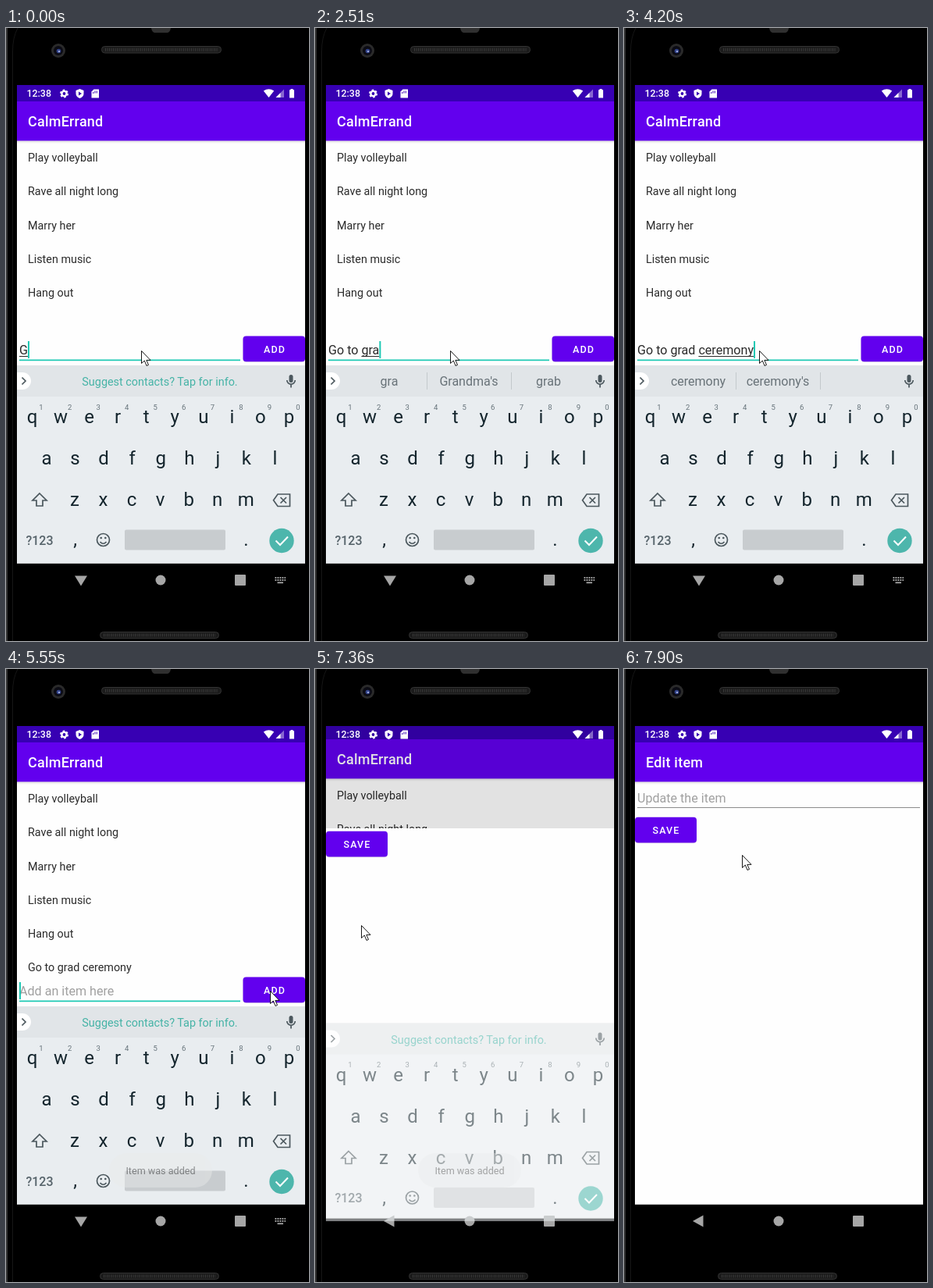
Animation of 388x785 px, one loop 8 s. Source, as an HTML page:

```html
<!DOCTYPE html>
<html lang="en">
<head>
<meta charset="utf-8">
<title>Todo list on a phone</title>
<style>
html, body { margin: 0; height: 100%; overflow: hidden; background: #000; }
svg { display: block; }
text { font-family: Roboto, sans-serif; white-space: pre; }
.mid { text-anchor: middle; }
.bar { font-size: 18px; font-weight: 500; letter-spacing: .22px; fill: #fff; }
.btn { font-size: 12.5px; font-weight: 500; letter-spacing: 1.1px; fill: #fff; text-anchor: middle; }
.field { font-size: 16.1px; fill: #2b2b2b; }
.hint { font-size: 16.1px; fill: #a0a0a0; }
.item { font-size: 14.35px; fill: #2b2b2b; }
.word { font-size: 16px; fill: #687278; text-anchor: middle; }
.key { font-size: 24px; fill: #14252d; text-anchor: middle; }
.num { font-size: 9.5px; fill: #66737a; text-anchor: middle; }
.icon { fill: none; stroke: #4b575d; stroke-width: 1.7; }
</style>
</head>
<body>
<svg width="388" height="785" viewBox="0 0 388 785">
  <defs>
    <clipPath id="screen"><rect x="14" y="73" width="369" height="612.6"/></clipPath>
    <clipPath id="reveal"><rect id="revealBox" x="14" y="73" width="369" height="640"/></clipPath>
    <linearGradient id="shade" x2="0" y2="1">
      <stop stop-color="#000" stop-opacity=".14"/><stop offset="1" stop-color="#000" stop-opacity="0"/>
    </linearGradient>
  </defs>

  <!-- phone body -->
  <rect width="388" height="785"/>
  <rect width="2" height="785" fill="#363636"/>
  <path d="M8.500 785V30Q8.500 12 15 0" fill="none" stroke="#161616"/>
  <path d="M186 0h25q-1 6-5 6h-15q-4 0-5-6z" fill="#303030"/>
  <circle cx="67" cy="29" r="9" fill="#2a2a2a"/>
  <circle cx="67" cy="29" r="6" fill="#0b0b14"/>
  <circle cx="67.500" cy="29.500" r="2.800" fill="#34458c"/>
  <circle cx="68" cy="30" r="1.100" fill="#b9c3ea"/>
  <g fill="#1b1b1b" stroke="#333">
    <rect x="122.500" y="23.500" width="153" height="8.500" rx="4"/>
    <rect x="120.500" y="773.500" width="152" height="8" rx="4"/>
  </g>
  <g stroke="#3a3a3a" stroke-width="4" stroke-dasharray="1 1.5">
    <path d="M127 27.700h144M125 777.500h143"/>
  </g>

  <!-- list screen -->
  <g clip-path="url(#screen)">
    <g id="list">
      <rect x="14" y="73" width="369" height="640" fill="#fefefe"/>
      <rect x="14" y="144" width="369" height="4" fill="url(#shade)"/>
      <rect x="14" y="73" width="369" height="21.300" fill="#3700b3"/>
      <rect x="14" y="94" width="369" height="50.400" fill="#6200ee"/>
      <text class="bar" x="28" y="126">CalmErrand</text>
      <g id="items"></g>
      <text id="addHint" class="hint" x="17" y="418">Add an item here</text>
      <text id="field" class="field" x="17" y="418"></text>
      <path id="underline" stroke="#2b2b2b"/>
      <rect x="17" y="424.500" width="283" height="1.700" fill="#1cc9b4"/>
      <rect id="caret" y="401" width="2" height="22" fill="#1cc9b4"/>
      <rect x="303.500" y="395" width="79.500" height="33" rx="4" opacity=".1"/>
      <rect x="303.500" y="394.600" width="79.500" height="32.600" rx="4" fill="#6200ee"/>
      <rect id="ripple" x="303.500" y="394.600" width="79.500" height="32.600" rx="4" fill="#fff"/>
      <text class="btn" x="344" y="415.700">ADD</text>
    </g>
    <rect id="dim" x="14" y="73" width="369" height="613"/>
  </g>

  <!-- edit screen -->
  <g id="editClip" clip-path="url(#reveal)">
    <g id="edit">
      <rect x="14" y="73" width="369" height="612.600" fill="#fefefe"/>
      <rect x="14" y="144" width="369" height="4" fill="url(#shade)"/>
      <rect x="14" y="73" width="369" height="21.300" fill="#3700b3"/>
      <rect x="14" y="94" width="369" height="50.400" fill="#6200ee"/>
      <text class="bar" x="28" y="126">Edit item</text>
      <text class="hint" x="17" y="171">Update the item</text>
      <path d="M17 177.500h362" stroke="#8c8c8c"/>
      <rect x="14" y="190.200" width="79" height="33" rx="4" opacity=".1"/>
      <rect x="14" y="189.800" width="79" height="32.600" rx="4" fill="#6200ee"/>
      <text class="btn" x="54" y="210.900">SAVE</text>
    </g>
  </g>

  <!-- navigation bar -->
  <g fill="#a6a6a6">
    <path id="back"/>
    <circle cx="198" cy="707" r="6.500"/>
    <rect x="293" y="700" width="14" height="14" rx="1"/>
    <g id="switcher" fill="none" stroke="#a6a6a6" stroke-width="1.800" stroke-dasharray="1.8 1.2">
      <path d="M344.500 704h13.500M344.500 707h13.500"/><path d="M347.500 710.300h7.500" stroke-dasharray="none"/>
    </g>
  </g>

  <!-- keyboard -->
  <g id="keyboard">
    <rect x="14" y="432" width="369" height="253.600" fill="#e9edf0"/>
    <rect x="14" y="432" width="369" height="40" fill="#e1e5e8"/>
    <path d="M14 441h7a11 11 0 0 1 0 22h-7z" fill="#fff"/>
    <path class="icon" d="M20.500 447.500l4.500 4.500-4.500 4.500"/>
    <text id="tip" class="mid" x="197" y="458" font-size="14.4" fill="#45b3a6">Suggest contacts? Tap for info.</text>
    <g id="words">
      <path d="M143.500 441v22M251.500 441v22" stroke="#c3c9cc"/>
      <text class="word" x="95" y="458"></text>
      <text class="word" x="197" y="458"></text>
      <text class="word" x="299" y="458"></text>
    </g>
    <rect x="362.500" y="444" width="5" height="10" rx="2.500" fill="#4b575d"/>
    <path class="icon" d="M359.800 451a5.200 5.200 0 0 0 10.400 0M365 456.500v4"/>
    <g id="keys"></g>
    <path class="icon" d="M43 596l9 9h-5v7h-8v-7h-5z"/>
    <path class="icon" d="M348 597h15.500v15.500h-15.500l-5.500-7.750zM351.500 601l7.500 7.500m0-7.500l-7.500 7.500"/>
    <text class="mid" x="43" y="661.500" font-size="16" font-weight="500" fill="#56636a">?123</text>
    <text class="key" x="88.500" y="663">,</text>
    <text class="key" x="307.500" y="663">.</text>
    <circle class="icon" cx="124.500" cy="655.500" r="8"/>
    <path class="icon" d="M120.500 658q4 4.500 8 0"/>
    <circle cx="121.700" cy="653" r="1.300" fill="#4b575d"/>
    <circle cx="127.300" cy="653" r="1.300" fill="#4b575d"/>
    <rect x="152" y="642.500" width="129" height="26" rx="2" fill="#c8cccf"/>
    <circle cx="353" cy="656.500" r="15.700" fill="#4db6ac"/>
    <path d="M345.500 656.500l5.500 5.500 10-10.500" fill="none" stroke="#fff" stroke-width="2"/>
  </g>

  <g id="toast">
    <rect x="132" y="620" width="132" height="44" rx="22" fill="#e9ebeb"/>
    <text class="mid" x="198" y="647" font-size="12.6" fill="#151515">Item was added</text>
  </g>

  <!-- status bar -->
  <g fill="#fff">
    <text x="26.500" y="88.300" font-size="12.4" font-weight="500">12:38</text>
    <circle cx="74.500" cy="84" r="3.100" fill="none" stroke="#fff" stroke-width="2.400"/>
    <circle cx="74.500" cy="84" r="4.700" fill="none" stroke="#fff" stroke-width="1.600" stroke-dasharray="2.6 2.32"/>
    <path d="M94.500 78l5 2v4q0 4-5 6-5-2-5-6v-4z"/>
    <path d="M93 81.500l4 2.500-4 2.500z" fill="#3700b3"/>
    <path d="M112.500 78.500h6.500v11h-9.500v-8z"/>
    <path d="M111.800 82v2m2.200-3.500v3m2.300-3v3" stroke="#3700b3"/>
    <path d="M329.800 80.500q6.700-4.500 13.400 0l-6.700 8.500z"/>
    <path d="M345.500 89h10.500v-10.500z" opacity=".4"/>
    <path d="M345.500 89h6v-6z"/>
    <path d="M364.500 78h3v1.200h1.500v10.300h-6v-10.300h1.500z"/>
  </g>

  <path id="mouse" d="M.5 .5V16.500L4.300 13l2.700 6.500 2.500-1.100-2.700-6h5.200z" fill="#fff" stroke="#000" stroke-width=".9"/>
</svg>

<script>
const LOOP = 8000, ADDED = 5310, OPEN = 7360;
const $ = id => document.getElementById(id);
const set = (id, attrs) => { for (const k in attrs) $(id).setAttribute(k, attrs[k]); };
const show = (id, on) => { $(id).style.display = on ? "" : "none"; };
const move = (id, x, y) => set(id, { transform: `translate(${x} ${y})` });

// Latest entry [time, ...values] that has begun at time t.
const at = (steps, t) => steps.findLast(s => s[0] <= t);

const typed = [
  [0, "G"], [500, "Go"], [750, "Go "], [1120, "Go t"], [1240, "Go to"], [1490, "Go to "],
  [1990, "Go to g"], [2130, "Go to gr"], [2510, "Go to gra"], [2630, "Go to grad"], [2770, "Go to grad "],
  [3150, "Go to grad ce"], [3400, "Go to grad cer"], [3550, "Go to grad cerem"], [3800, "Go to grad ceremo"],
  [3920, "Go to grad ceremon"], [4200, "Go to grad ceremony"], [ADDED, ""]
];
const suggested = [
  [0], [750, "to", "buy", "out"], [1120, "t", "the", "Tomorrow"], [1240, "to", "too", "Tomorrow"],
  [1490, "the", "sleep", "be"], [1990, "g", "get", "go"], [2260, "gr", "great", "Grandma's"],
  [2510, "gra", "Grandma's", "grab"], [2630, "grad", "graduation", "graduate"], [2900, "at", "school", "party"],
  [3150, "ce", "cell", "cent"], [3400, "cer", "cereal", "certainly"], [3550, "cerem", "ceremony", "ceremonies"],
  [3800, "ceremo", "ceremony", "ceremonies"], [3920, "ceremon", "ceremony", "ceremonies"],
  [4200, "ceremony", "ceremony's", ""], [ADDED]
];
const pointer = [
  [0, 173, 413], [4630, 190, 411], [4750, 222, 405], [4900, 317, 393], [5050, 334, 406], [5170, 338, 412],
  [5820, 325, 405], [5940, 285, 388], [6060, 215, 366], [6180, 165, 351], [6330, 128, 349],
  [6480, 92, 339], [6600, 68, 330], [6720, 59, 328], [7900, 151, 238]
];
const ripple = [[0, 0], [5310, .25], [5430, .12], [5550, 0]];
const toast = [
  [0, 0], [5430, .15], [5550, .44], [5700, .8], [5820, 1], [7110, 0],
  [OPEN, .36], [7480, .2], [7630, .08], [7760, 0]
];
// time, top of revealed area, its offset, list offset, dimming, keyboard opacity, keyboard offset
const opening = [
  [0, 713, 0, 0, 0, 1, 0], [OPEN, 204, 18, -4, .11, .55, 21.5],
  [7480, 96, 4, -9, .1, .1, 38], [7630, 74, .5, -10, .1, 0, 0], [7760, 73, 0, 0, 0, 0, 0]
];

const label = (cls, x, y, s) => `<text class="${cls}" x="${x}" y="${y}">${s}</text>`;
const keyRow = (letters, x, y) => [...letters].map((c, i) => label("key", x + 36.55 * i, y, c)).join("");

$("items").innerHTML =
  ["Play volleyball", "Rave all night long", "Marry her", "Listen music", "Hang out", "Go to grad ceremony"]
    .map((s, i) => label("item", 28, 171.3 + 43.1 * i, s)).join("");
$("keys").innerHTML =
  keyRow("qwertyuiop", 33.5, 506) + keyRow("asdfghjkl", 52, 559) + keyRow("zxcvbnm", 88, 612) +
  [..."1234567890"].map((c, i) => label("num", 45 + 36.55 * i, 488.5, c)).join("");
const newItem = $("items").lastChild;
const words = $("words").querySelectorAll("text");

function drawField(t) {
  const [since, text] = at(typed, t);
  const field = $("field");
  field.textContent = text;
  const width = n => n ? field.getSubStringLength(0, n) : 0;
  const end = 17 + width(text.length);
  const start = 17 + width(text.lastIndexOf(" ") + 1);
  set("underline", { d: `M${start} 420.5H${end}` });
  set("caret", { x: end });
  show("caret", (t - since + 30) % 1000 < 540);
  show("addHint", !text);
}

function render(t) {
  drawField(t);
  newItem.style.display = t < ADDED ? "none" : "";

  const [, ...options] = at(suggested, t);
  show("tip", !options.length);
  show("words", options.length);
  words.forEach((w, i) => { w.textContent = options[i] || ""; });

  const [, top, editY, listY, dim, kbAlpha, kbY] = at(opening, t);
  set("revealBox", { y: top });
  show("editClip", t >= OPEN);
  move("edit", 0, editY);
  move("list", 0, listY);
  set("dim", { opacity: dim });
  set("keyboard", { opacity: kbAlpha });
  move("keyboard", 0, kbY);

  set("ripple", { opacity: at(ripple, t)[1] });
  set("toast", { opacity: at(toast, t)[1] });
  set("back", { d: t < OPEN ? "M88 701.500h16l-8 13z" : "M88 707l13.500-7.500v15z" });
  show("switcher", t < OPEN);

  const [, x, y] = at(pointer, t);
  move("mouse", x, y);
}

function tick() {
  render(performance.now() % LOOP);
  requestAnimationFrame(tick);
}
tick();
</script>
</body>
</html>
```
